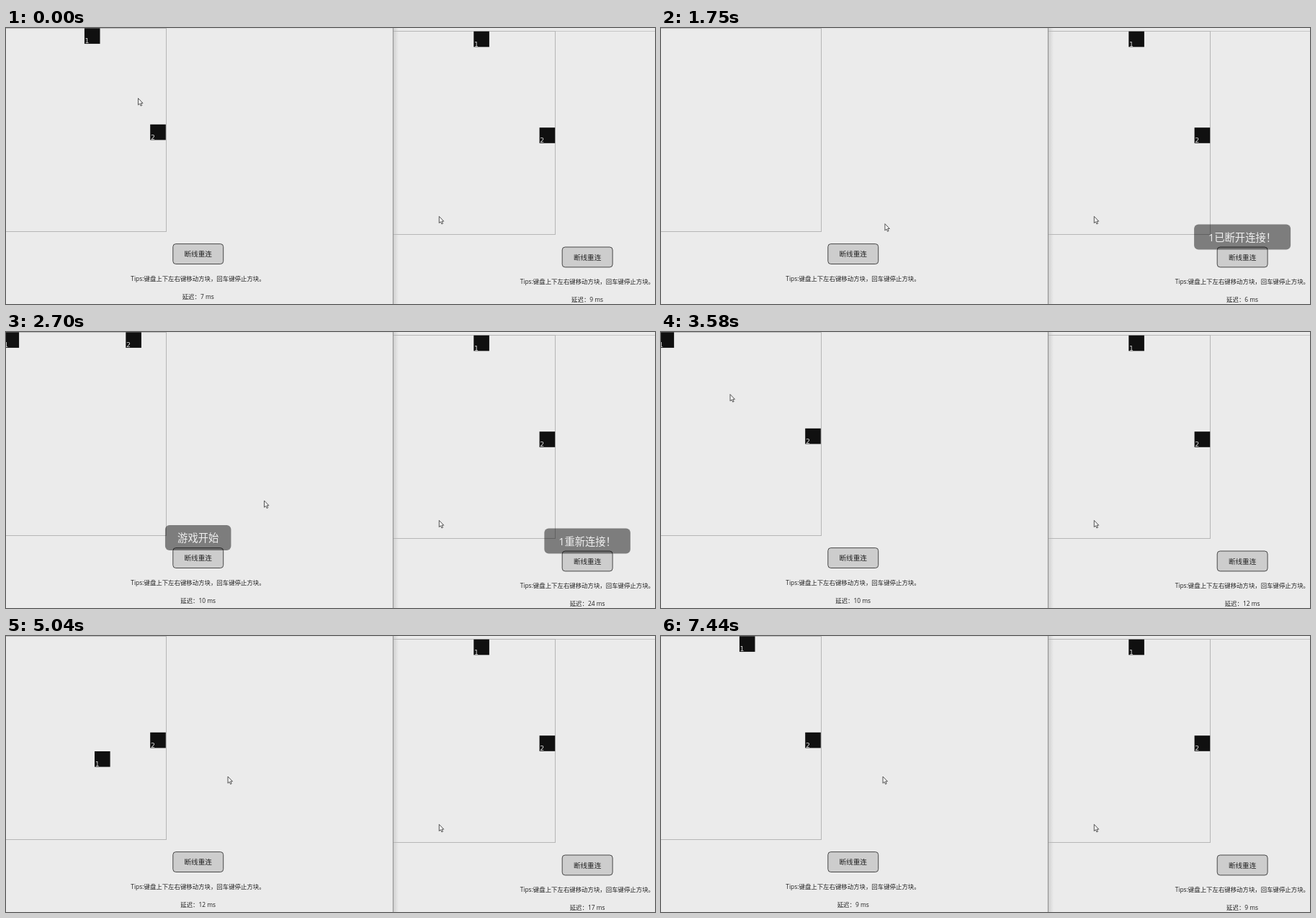
Animation, 901 px wide and 383 px high, one loop 7660 ms. Source, as an HTML page:

```html
<!DOCTYPE html>
<html lang="zh-CN">
<head>
<meta charset="utf-8">
<title>断线重连</title>
<style>
  html, body { margin: 0; width: 100%; height: 100%; overflow: hidden; background: #ebebeb; }
  svg { display: block; width: 901px; height: 383px; }
  text { font: 8.42px "Open Sans", "Noto Sans CJK SC", sans-serif; fill: #222; }
  .mid { text-anchor: middle; }
  .box text { font: 9.4px "DejaVu Sans", sans-serif; fill: #ddd; }
  .box rect { fill: #101010; }
  .frame { fill: none; stroke: #b6b6b6; shape-rendering: crispEdges; }
  .button rect { fill: #cdcdcd; stroke: #484848; }
  .button text { font-size: 9.6px; }
  .toast rect { fill: #000; fill-opacity: .47; }
  .toast text { font-size: 14.3px; fill: #f0f0f0; }
  .cursor { fill: #f4f4f4; stroke: #444; stroke-width: .9; stroke-linejoin: round; }
</style>
</head>
<body>
<svg id="stage" viewBox="0 0 901 383">
  <defs>
    <linearGradient id="shade">
      <stop offset="0" stop-color="#000" stop-opacity=".13"/>
      <stop offset="1" stop-color="#000" stop-opacity="0"/>
    </linearGradient>
  </defs>
</svg>
<script>
const LOOP = 7660, STEP = 72.95;
const DROP = 1530, RECONNECT = 2190, REFRESH = 220;
const CENTER = 266.7, SPEED = .722;

const topSpot = [108.9, .3], sideSpot = [200.2, 133.8], home = [-3.5, .3];

// pointer moves: start, duration, x, y
const pointer = [
  [210, 240, 132, 215], [450, 300, 229.5, 320], [950, 360, 260, 312],
  [1460, 600, 358.5, 234], [2900, 680, 96, 86.5], [3670, 60, 48.5, 24.5],
  [3890, 350, 308, 195]
];

// squares glide at one speed after a reconnect: start, x, y
const first = glide([
  [4450, -3.5, 160], [4860, 123, 160], [5250, 123, 218],
  [5480, 108.9, 218], [5775, ...topSpot]
]);
const second = glide([[2480, 200.2, .3], [2840, ...sideSpot]]);

// typical delay of both sides from a given time
const delays = [
  [0, 7, 9], [870, 7, 7], [RECONNECT, 9, 25], [3580, 10, 12],
  [5040, 12, 17], [5990, 8, 10], [7440, 9, 9]
];

const stage = document.getElementById("stage");
const find = id => document.getElementById(id);

const box = (id, n, spot) => `<g class="box" id="${id}${n}" transform="translate(${spot})">
  <rect width="21.6" height="21.6"/><text x=".7" y="21.2">${n}</text></g>`;

const toast = (id, label, w) => `<g class="toast" id="${id}" visibility="hidden">
  <rect x="${CENTER - w / 2}" y="268" width="${w}" height="35" rx="6"/>
  <text class="mid" x="${CENTER}" y="291.2">${label}</text></g>`;

const panel = (id, dx, dy, mouse, toasts) => `<g transform="translate(${dx} ${dy})">
  <path class="frame" d="M-3 .5H222.5V282.5H-3"/>
  ${box(id, 1, topSpot)}${box(id, 2, sideSpot)}
  <g class="button"><rect x="231.8" y="299.6" width="69.9" height="27.9" rx="4"/>
    <text class="mid" x="${CENTER}" y="317.3">断线重连</text></g>
  <text x="173.3" y="351">Tips:键盘上下左右键移动方块，回车键停止方块。</text>
  <text class="mid" id="${id}Delay" x="${CENTER}" y="376"></text>
  ${toasts}
  <path class="cursor" id="${id}Cursor" transform="translate(${mouse})"
    d="M0 0V9.3L2.1 7.4L3.6 10.6L5.2 9.9L3.7 6.8H6.5Z"/>
</g>`;

stage.insertAdjacentHTML("beforeend", `
  <path d="M222 .5H537" stroke="#dedede"/>
  <path d="M537 4.5H901" stroke="#c6c6c6"/>
  <rect x="537" width="8" height="383" fill="url(#shade)"/>
  ${panel("left", 0, 0, [183.5, 97.5], toast("start", "游戏开始", 91.5))}
  ${panel("right", 540.4, 4.4, [60.9, 257],
    toast("lost", "1已断开连接！", 134) + toast("back", "1重新连接！", 119.5))}
  <path d="M537.4 0V383" stroke="#8c8c8c"/>`);

// turns constant-speed legs into timed moves
function glide(legs) {
  let [px, py] = home;
  return legs.map(([start, x, y]) => {
    const move = [start, Math.hypot(x - px, y - py) / SPEED, x, y];
    [px, py] = [x, y];
    return move;
  });
}

function at(from, moves, t, ease = k => k) {
  let [x, y] = from;
  for (const [start, length, toX, toY] of moves) {
    if (t <= start) break;
    const k = ease(Math.min(1, (t - start) / length));
    x += (toX - x) * k;
    y += (toY - y) * k;
  }
  return [x, y];
}

const soften = k => k * k * (3 - 2 * k);

function noise(n) {
  const v = Math.sin(n * 12.9898) * 43758.5453;
  return v - Math.floor(v);
}

// the typical value first, then a small wobble at every refresh
function delay(side, t) {
  const [start, ...typical] = delays.filter(d => d[0] <= t).pop();
  const n = Math.floor((t - start) / REFRESH);
  const wobble = n ? Math.floor(noise(start + n * 2 + side) * 4) - 1 : 0;
  return `延迟：${typical[side] + wobble} ms`;
}

const place = (id, [x, y]) =>
  find(id).setAttribute("transform", `translate(${x.toFixed(1)} ${y.toFixed(1)})`);

const show = (id, on) => find(id).setAttribute("visibility", on ? "visible" : "hidden");

function draw(time) {
  const t = Math.floor(time / STEP + .1) * STEP + 16;
  const dropped = t >= DROP, back = t >= RECONNECT;

  place("leftCursor", at([183.5, 97.5], pointer, t, soften));
  place("left1", dropped ? at(home, first, t) : topSpot);
  place("left2", dropped ? at(home, second, t) : sideSpot);
  show("left1", back || !dropped);
  show("left2", back || !dropped);

  const fade = Math.max(0, Math.min(1, (3150 - t) / 200));
  for (const id of ["start", "back"]) {
    show(id, back && fade > 0);
    find(id).setAttribute("opacity", fade);
  }
  show("lost", dropped && !back);

  find("leftDelay").textContent = delay(0, t);
  find("rightDelay").textContent = delay(1, t);
  show("leftDelay", !dropped || t >= RECONNECT + REFRESH);
}

const begin = performance.now();
function tick() {
  draw((performance.now() - begin) % LOOP);
  requestAnimationFrame(tick);
}
tick();
</script>
</body>
</html>
```
